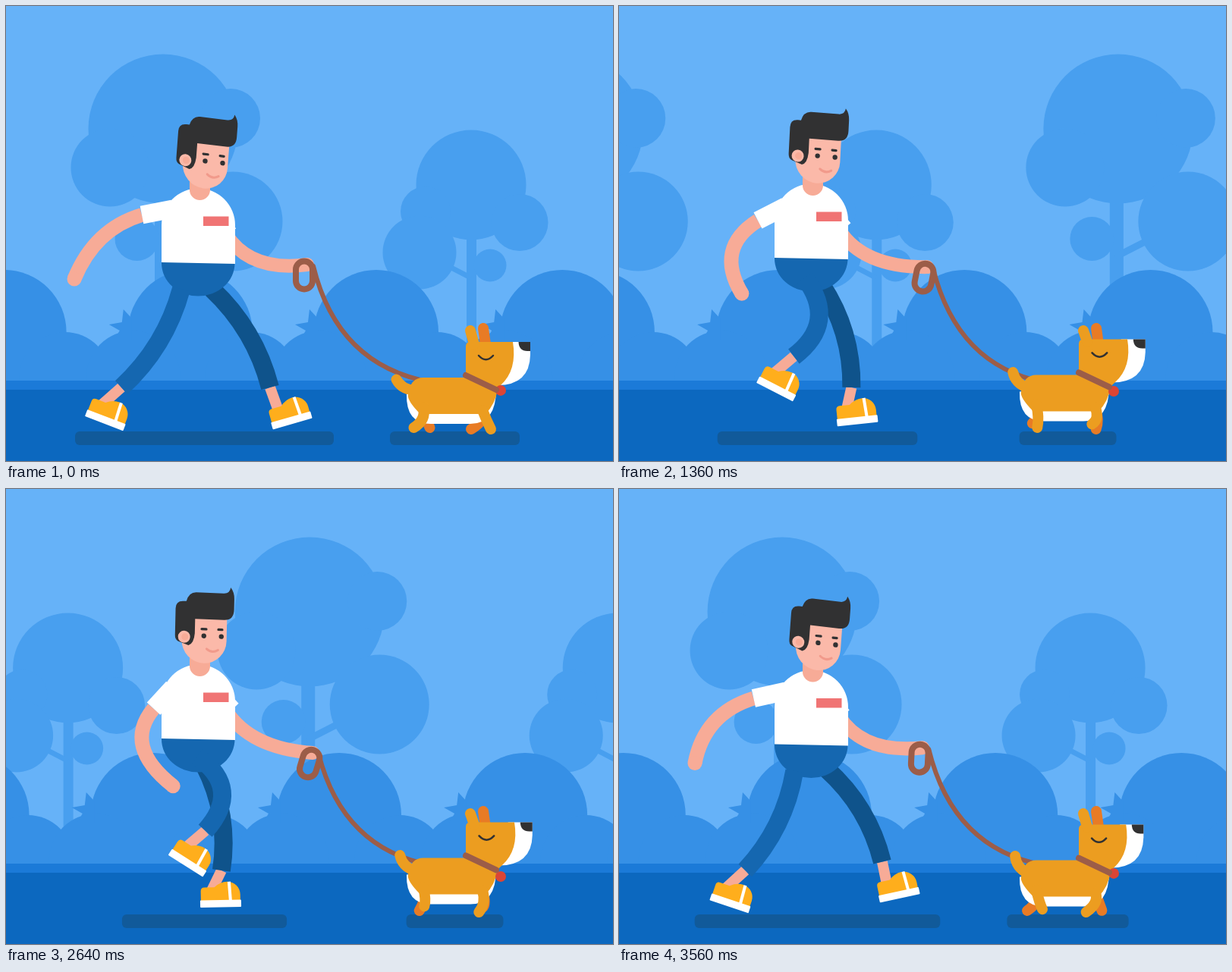
Animation, 800 px wide and 600 px high, one loop 3.6 s. Source, as an HTML page with a canvas:

```html
<!DOCTYPE html>
<html lang="en">
<head>
<meta charset="utf-8">
<title>Walking the dog</title>
<style>
html, body { margin: 0; width: 100%; height: 100%; overflow: hidden; background: #66b2f8; }
canvas { display: block; }
</style>
</head>
<body>
<canvas id="stage" width="800" height="600"></canvas>
<script>
const ctx = document.getElementById('stage').getContext('2d');
const LOOP = 3600, TICK = 40, STRIDE = 1200, STEP = STRIDE / 2, TROT = 800, HOP = TROT / 2;
const C = {
  sky: '#66b2f8', tree: '#489fef', bush: '#3690e6', strip: '#1b7ad8', ground: '#0c68bf',
  shadow: '#115a9a', skin: '#f7ab97', face: '#fbb9a9', lips: '#f19a8b', hair: '#313132',
  white: '#fff', badge: '#f07474', jeans: '#1567b0', jeansFar: '#0f538b', shoe: '#ffae1c',
  leash: '#9c5d48', dog: '#ec9d20', dogFar: '#e87b25', tag: '#db4535'
};

// Drawing helpers
const fill = (color, path) => { ctx.fillStyle = color; ctx.fill(new Path2D(path)); };
const stroke = (color, width, path, cap = 'round') => {
  ctx.strokeStyle = color; ctx.lineWidth = width; ctx.lineCap = cap;
  ctx.stroke(new Path2D(path));
};
const dot = (color, x, y, r) => {
  ctx.fillStyle = color; ctx.beginPath(); ctx.arc(x, y, r, 0, 7); ctx.fill();
};
const box = (color, x, y, w, h, r = 0) => {
  ctx.fillStyle = color; ctx.beginPath(); ctx.roundRect(x, y, w, h, r); ctx.fill();
};
const placed = (x, y, degrees, draw) => {
  ctx.save(); ctx.translate(x, y); ctx.rotate(degrees * Math.PI / 180); draw(); ctx.restore();
};
const shadow = (center, width) => box(C.shadow, center - width / 2, 561, width, 18, 6);

// Timing helpers
const cos = (t, period) => Math.cos(2 * Math.PI * t / period);
const sin = (t, period) => Math.sin(2 * Math.PI * t / period);
const fromPeak = (t, period) => Math.min(t % period, period - t % period);

function repeat(x, period, draw) {
  for (x = x % period - period; x < 800 + period; x += period) placed(x, 0, 0, draw);
}
function bigTree() {
  box(C.tree, -11, 240, 18, 200);
  stroke(C.tree, 9, 'M0 329L45 306');
  dot(C.tree, 0, 162, 98.5);
  dot(C.tree, 89, 148, 39);
  dot(C.tree, -70, 213, 51.5);
  dot(C.tree, 92, 284, 65.5);
  dot(C.tree, -34.5, 307, 29);
}
function smallTree() {
  box(C.tree, -6, 290, 13, 170);
  stroke(C.tree, 7, 'M-32 342L-3 357');
  dot(C.tree, 0, 236, 72.5);
  dot(C.tree, -60, 271, 33);
  dot(C.tree, -68, 325, 48.5);
  dot(C.tree, 64, 285.5, 37.5);
  dot(C.tree, 25, 342, 21.5);
}
function bush() {
  dot(C.bush, 0, 430, 82);
  dot(C.bush, -75, 490, 62);
  dot(C.bush, 80, 490, 60);
  fill(C.bush, 'M-88 400L-77 412V440H-100L-93 428L-107 420L-90 417Z');
}
function scenery(t) {
  const far = 724.6, near = 245.2;
  box(C.sky, 0, 0, 800, 600);
  repeat(207 + far - t * far / LOOP, far, bigTree);
  repeat(613 + far - t * far / LOOP, far, smallTree);
  box(C.bush, 0, 455, 800, 45);
  repeat(488 + near * 3 - t * near / STRIDE, near, bush);
  box(C.strip, 0, 494, 800, 13);
  box(C.ground, 0, 506, 800, 94);
}

// The foot slides back evenly on the ground, then lifts and swings forward
function leg(t, waist, shift, color) {
  const back = 1 - 2 * fromPeak(t, STRIDE) / STEP;   // 1 behind, -1 in front
  const side = sin(t, STRIDE), lift = Math.max(0, side);
  const footX = 248 - 114 * back + 19 * Math.sqrt(lift), footY = 538 - 55 * lift;
  const tilt = 2.5 + 18.5 * back + 29 * lift * lift;
  const cuffX = footX - 4 + 22 * back + 10 * (Math.abs(side) + lift * lift), cuffY = footY - 35;
  const hipX = 245 - 14 * cos(t, STRIDE) + 12 * lift, hipY = waist + 34 - 12 * lift;

  const dx = cuffX - hipX, dy = cuffY - hipY, length = Math.hypot(dx, dy);
  const bend = Math.max(22, Math.sqrt(Math.max(0, 74 ** 2 - length ** 2 / 4))) / length;
  const kneeX = (hipX + cuffX) / 2 + dy * bend, kneeY = (hipY + cuffY) / 2 - dx * bend;
  const a = tilt * Math.PI / 180;
  const ankleX = footX - 13 * Math.cos(a) + 6 * Math.sin(a);
  const ankleY = footY - 13 * Math.sin(a) - 6 * Math.cos(a);

  placed(shift, 0, 0, () => {
    stroke(C.skin, 14, `M${cuffX} ${cuffY}L${ankleX} ${ankleY}`, 'butt');
    stroke(color, 24, `M${hipX} ${hipY}Q${kneeX} ${kneeY} ${cuffX} ${cuffY}`, 'butt');
    placed(footX, footY, tilt, () => {
      fill(C.shoe, 'M-26 5V-8Q-26 -13 -21 -13H-8Q0 -20 9 -20A17 17 0 0 1 26 -3V5Z');
      stroke(C.white, 4, 'M11.5 -20L13 5', 'butt');
      box(C.white, -27, 4, 54, 9.5, 1);
    });
  });
}

function nearArm(t, waist) {
  const c = cos(t, STRIDE), s = Math.abs(sin(t, STRIDE));
  const sleeve = `${218 - 39 * c - 12 * s} ${288 - 12.5 * c + 6 * s * s}`;
  const elbow = `${211 - 94 * c - 30 * s} ${317 - 23 * c + 32 * s * s}`;
  const handX = 233 - 143 * c + 33 * s, handY = 360 + 35 * s * s;
  stroke(C.skin, 19, `M${handX} ${handY}Q${elbow} ${sleeve}`, 'butt');
  dot(C.skin, handX, handY, 9.5);
  stroke(C.white, 24, `M220 ${64 + waist * .6}L${sleeve}`, 'butt');
}

function head(t, waist) {
  const nod = cos(t, STRIDE);
  ctx.save();
  ctx.translate(240 + 1.5 * nod, waist - 124);
  ctx.transform(1, .12 * nod, -.075 * nod, 1, 0, 0);
  ctx.translate(-240, -206);
  fill(C.face, 'M231 165H290V199A29.5 30 0 0 1 231 199Z');
  fill(C.hair, 'M222 158Q222 148 232 148H236Q239 136 249 136H285Q293 136 294 128Q299 134 299 143V157' +
    'Q299 171 286 171H248V190Q247 204 240 206L226 201Q222 199 222 193Z');
  dot(C.face, 234, 195, 8);
  dot(C.skin, 235, 195, 4.5);
  stroke(C.hair, 3.2, 'M257 184H263M279 184H284');
  dot(C.hair, 260, 193, 3.2);
  dot(C.hair, 283, 193, 3.2);
  stroke(C.lips, 3, 'M264 210Q271 216 279 211');
  ctx.restore();
}

function man(t) {
  const d = fromPeak(t, STEP), y = 339 - .0375 * d;
  const gripX = 393 + 9 * Math.sin(Math.PI * d / 340), gripY = 355 + 7 * (d / 240) ** 2;

  shadow(261.5, 341 - .42 * d - .0004 * d * d);
  stroke(C.skin, 18, `M290 ${y - 38}Q322 ${y + 12} ${gripX + 4} ${gripY - 14}`);
  stroke(C.white, 24, `M282 ${y - 56}L${293 + d * .02} ${y - 39}`, 'butt');
  leg(t + STEP, y, 12, C.jeansFar);
  fill(C.jeans, `M205 ${y - 2}H301.5V${y}A48.25 43.5 0 0 1 205 ${y}Z`);
  leg(t, y, 0, C.jeans);
  fill(C.white, `M205 ${y - 1}V${y - 50}A48.5 48.5 0 0 1 302 ${y - 50}V${y + 1}Z`);
  fill(C.skin, `M242 ${y - 115}H269V${y - 96.5}A13.5 13.5 0 0 1 242 ${y - 96.5}Z`);
  head(t, y);
  nearArm(t, y);
  box(C.badge, 260, y - 61.5, 33.5, 12.5);

  stroke(C.leash, 6, `M${gripX + 12} ${gripY - 12}Q${gripX + 44} 474 560 496`);
  placed(gripX, gripY, d * .07, () => {
    ctx.strokeStyle = C.leash; ctx.lineWidth = 8;
    ctx.beginPath(); ctx.roundRect(-11, -18.5, 22, 37, 11); ctx.stroke();
  });
}

function dogLegs(t, dy, color, shift) {
  const swing = cos(t, TROT), lift = sin(t, TROT);
  stroke(color, 14, `M550 ${529 + dy}Q554 ${546 + dy} ${548 - 10.5 * swing} ${556 - 6 * Math.max(0, lift)}`);
  stroke(color, 14, `M628 ${533 + dy}Q633 546 ${627 + shift + 12 * swing} ${558 - 7 * Math.max(0, -lift)}`);
}

function dog(t) {
  const dy = 2 * cos(t, HOP) - 2;
  shadow(591.5, 171 - .27 * fromPeak(t, HOP));
  dogLegs(t + HOP, dy, C.dogFar, -2);
  placed(538, 507 + dy, -12 * cos(t, TROT), () => stroke(C.dog, 14, 'M-20 -19Q-16 -5 0 0'));
  stroke(C.dogFar, 14, 'M629 425L632 446');
  placed(0, dy, 0, () => {
    fill(C.white, 'M528 512Q527 551 560 551H612Q646 551 646 505Z');
    fill(C.dog, 'M550 490H610V480H648V505Q645 525 632 538H546Q528 520 530 512Q533 490 550 490Z');
  });
  dogLegs(t, dy, C.dog, 0);
  placed(606, dy, 0, () => {
    ctx.scale(1 - dy * .009, 1);
    ctx.translate(-606, 0);
    fill(C.white, 'M660 443H691V460Q690 500 648 500Z');
    fill(C.dog, 'M606 449Q606 443 612 443H668Q674 480 652 500L646 506L606 490Z');
    fill(C.hair, 'M675.5 443H691V455H687Q676 455 675.5 443Z');
    stroke(C.hair, 2.5, 'M623 461Q632.5 471.5 642 461');
  });
  stroke(C.dog, 14, `M612 428L617 ${446 + dy}`);
  dot(C.tag, 652, 511.2 + dy - 4.3 * cos(t, STEP), 7);
  stroke(C.leash, 8, `M606 ${487 + dy}L646 ${506 + dy}`);
}

const start = performance.now();
(function frame() {
  const now = (performance.now() - start) % LOOP;
  const t = Math.floor(now / TICK) * TICK;
  scenery(t);
  man(t);
  dog(t);
  requestAnimationFrame(frame);
})();
</script>
</body>
</html>
```
